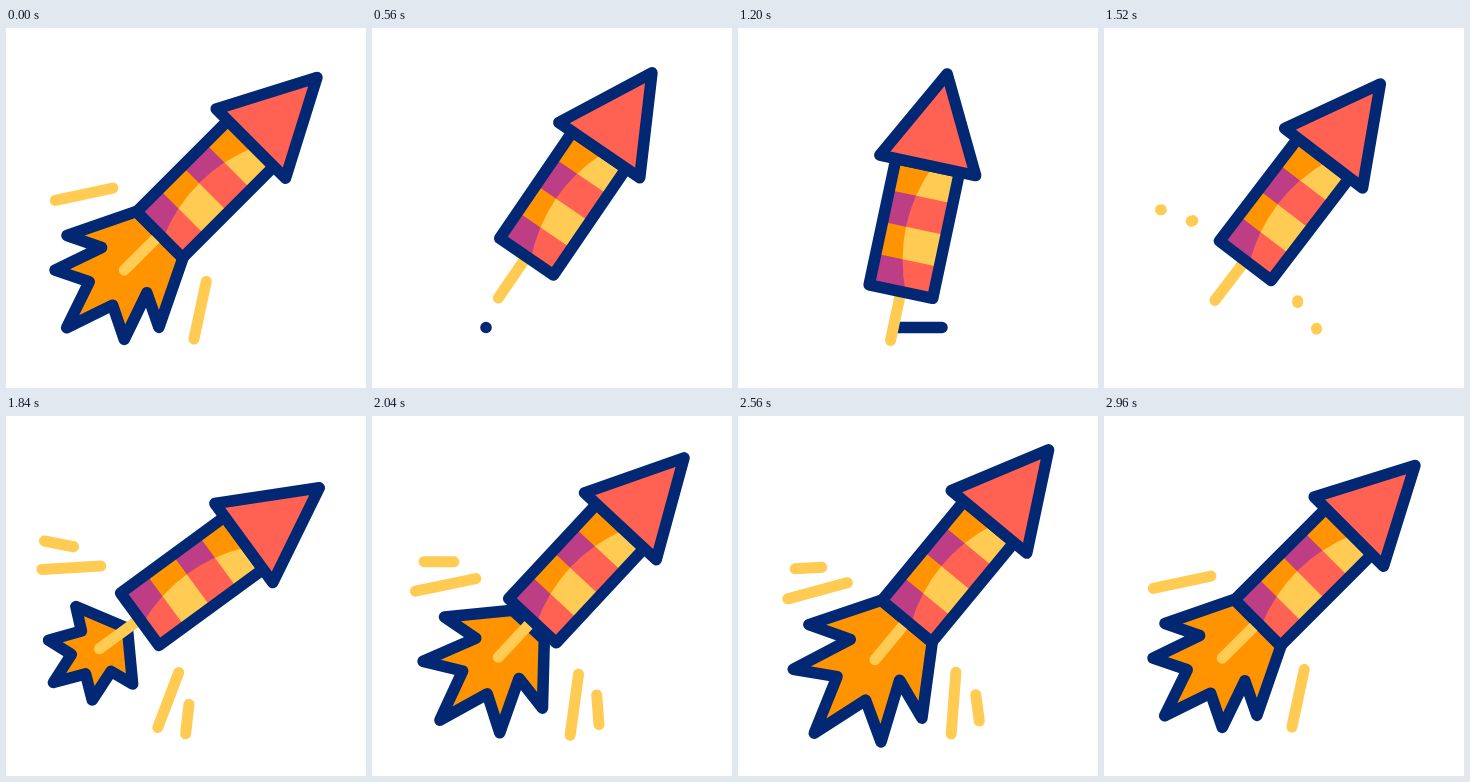
Write an HTML page that moves like this. It is 360x360 px and loops after 3000 ms.

```html
<!DOCTYPE html>
<html lang="en">
<head>
<meta charset="utf-8">
<title>Rocket</title>
<style>
  html, body { margin: 0; width: 100%; height: 100%; overflow: hidden; background: #fff; }
  svg { display: block; width: 100vw; height: 100vh; }
  .ink { stroke: #022873; stroke-width: 11.5; stroke-linecap: round; stroke-linejoin: round; }
  .glow { stroke: #ffcb52; stroke-width: 11; stroke-linecap: round; }
</style>
</head>
<body>
<svg viewBox="0 0 360 360">
  <path id="ground" class="ink"/>
  <!-- Upright rocket, origin at the middle of the hull's base -->
  <g id="rocket">
    <path id="dashes" class="glow"/>
    <path id="flame" class="ink" fill="#ff9400"/>
    <path class="glow" d="M0 0V50"/>
    <clipPath id="side"><path d="M-33 0H5Q-22 -64.5 5 -129H-33Z"/></clipPath>
    <path fill="#ffcb52" d="M-32.5 -129h65V0h-65Z"/>
    <path fill="#ff6152" d="M-32.5 -97h65v32.5h-65ZM-32.5 -32h65V0h-65Z"/>
    <g clip-path="url(#side)">
      <path fill="#ff9400" d="M-32.5 -129h65V0h-65Z"/>
      <path fill="#bd3e85" d="M-32.5 -97h65v32.5h-65ZM-32.5 -32h65V0h-65Z"/>
    </g>
    <path class="ink" fill="none" d="M-32.5 -129h65V0h-65Z"/>
    <path class="ink" fill="#ff6152" d="M0 -222.5L49 -129H-49Z"/>
  </g>
</svg>
<script>
const LOOP = 3000, STEP = 40, CENTER = 111, SHARPNESS = 3.5;
const $ = id => document.getElementById(id);
const ease = s => s < .5 ? (2 * s) ** SHARPNESS / 2 : 1 - (2 - 2 * s) ** SHARPNESS / 2;
const ramp = (t, from, to) => ease(Math.min(1, Math.max(0, (t - from) / (to - from))));
const mix = (a, b, p) => a.map((v, i) => v + (b[i] - v) * p);

// Eased interpolation through rows of [time, values]
function track(keys, t) {
  const i = keys.findIndex(k => k[0] > t);
  if (i === 0) return keys[0][1];
  if (i < 0) return keys[keys.length - 1][1];
  const [t0, a] = keys[i - 1], [t1, b] = keys[i];
  return mix(a, b, ramp(t, t0, t1));
}

// Centre x, centre y, angle
const cruise = [232.1, 128.3, 45], standing = [186, 155, 12];
const poses = [
  [180, cruise], [1040, standing], [1200, standing],
  [1800, [223.3, 137.7, 53.8]], [2240, [243.2, 115.5, 36.9]], [2960, cruise]
];

// Right half of the flame from the hull down to the middle tip
const steady = [33, 0, 65, 66, 32, 50, 49, 99, 16.5, 83, 0, 131.5];
const spark = [1, 16, 48, 44, 25, 54, 37, 86, 12, 76, 0, 107];
const blast = [33, 0, 77.5, 64.5, 32, 50, 61, 114.5, 19.5, 89, 0, 152];
const none = steady.map(() => 0);
const flames = [
  [160, steady], [560, none], [1440, none], [1800, spark], [2240, blast], [2960, steady]
];

// Inner end to outer end, right side
const nearDash = [66, 0, 98, 49.5], farDash = [72.5, 12, 110, 63];
const longDash = [[1800, nearDash], [2240, farDash], [2960, nearDash]];
const shortDash = [97.6, 10.5, 119.5, 30.7];

const dashPath = ([x0, y0, x1, y1], start, end, side) => {
  if (end - start < .002) return '';
  const at = p => `${side * (x0 + (x1 - x0) * p)} ${y0 + (y1 - y0) * p}`;
  return `M${at(start)}L${at(end)}`;
};

const flamePath = half => {
  const right = [];
  for (let i = 0; i < half.length; i += 2) right.push([half[i], half[i + 1]]);
  const left = right.slice(0, -1).reverse().map(([x, y]) => [-x, y]);
  return 'M' + [...right, ...left].map(p => p.join(' ')).join('L') + 'Z';
};

function draw(t) {
  const [x, y, angle] = track(poses, t);
  $('rocket').setAttribute('transform', `translate(${x} ${y}) rotate(${angle}) translate(0 ${CENTER})`);

  const burning = t < 560 || t > 1440;
  $('flame').setAttribute('d', burning ? flamePath(track(flames, t)) : '');

  const early = t < 1000;
  const grown = early ? 1 : ramp(t, 1440, 1800);
  const longStart = early ? ramp(t, 160, 560) : 0;
  const shortStart = early ? 1 : ramp(t, 2400, 2900);
  $('dashes').setAttribute('d', [-1, 1].map(side =>
    dashPath(track(longDash, t), longStart, grown, side) +
    dashPath(shortDash, shortStart, grown, side)).join(''));

  const from = 114 + 90 * ramp(t, 1000, 1400), to = 114 + 90 * ramp(t, 540, 1000);
  $('ground').setAttribute('d', t >= 540 && t < 1400 ? `M${from} 299.5H${to + .01}` : '');
}

const begin = performance.now();
function frame() {
  const t = Math.max(0, performance.now() - begin) % LOOP;
  draw(Math.floor(t / STEP) * STEP);
  requestAnimationFrame(frame);
}
frame();
</script>
</body>
</html>
```
